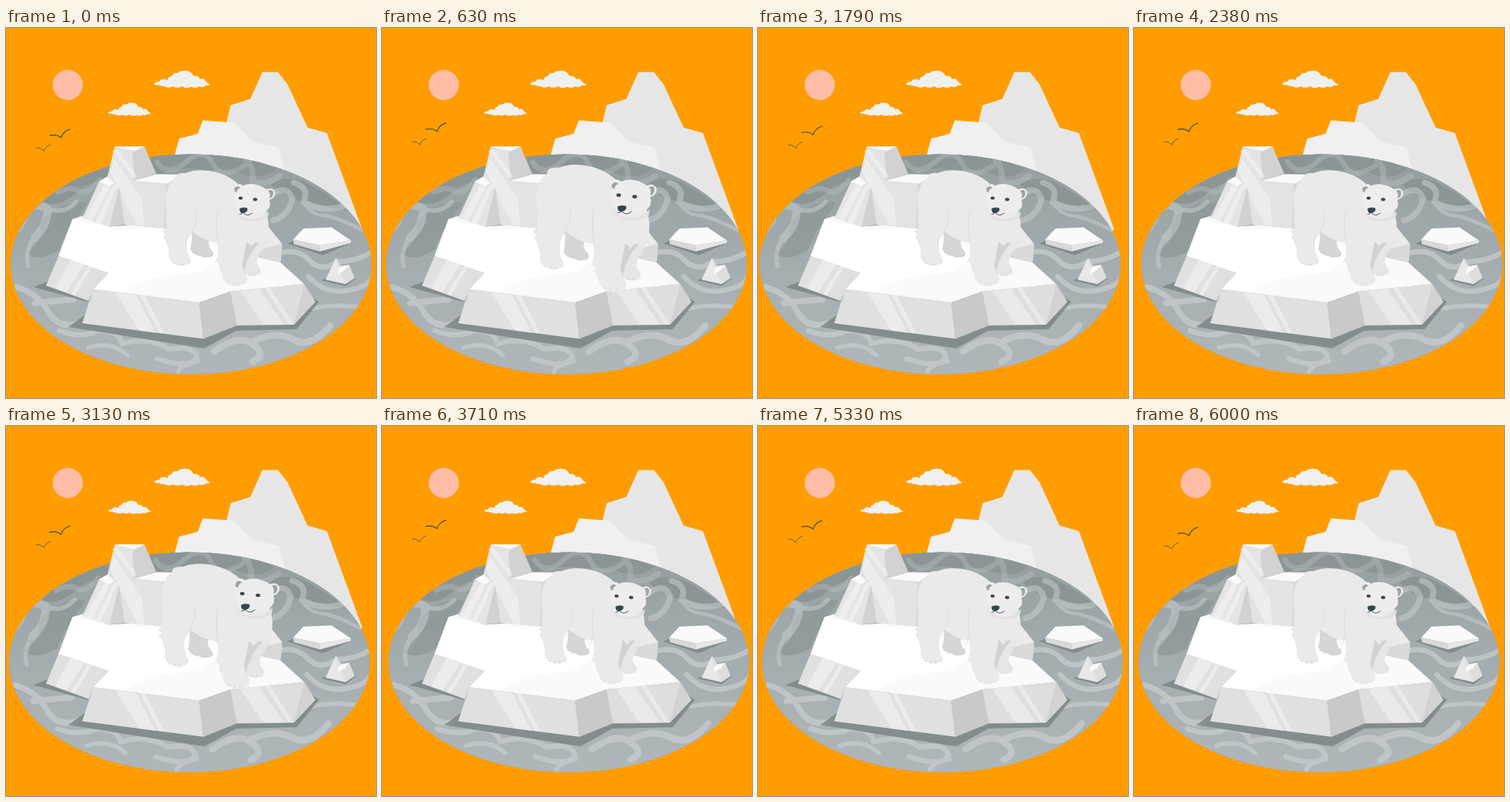
An HTML page that plays this animation: 500x500 px, repeating every 6040 ms.

```html
<!DOCTYPE html>
<html lang="en">
<head>
<meta charset="utf-8">
<title>Polar bear on the ice</title>
<style>
html, body { margin: 0; height: 100%; overflow: hidden; background: #ff9d00; }
svg { display: block; width: 100%; height: 100%; }
.light path { fill: none; stroke: #c6cbce; stroke-linecap: round; stroke-linejoin: round; }
.shine { fill: #fff; opacity: .36; }
.shade { fill: #7c8787; opacity: .85; }
.ink { fill: none; stroke: #37474f; stroke-linecap: round; }
</style>
</head>
<body>
<svg viewBox="0 0 500 500">
  <defs>
    <ellipse id="rim" cx="250" cy="319.3" rx="243.8" ry="148.8"/>
    <clipPath id="pool"><use href="#rim"/></clipPath>
    <linearGradient id="deep" x1="0" y1="0" x2="0" y2="1">
      <stop offset="0" stop-color="#929c9d"/>
      <stop offset=".3" stop-color="#9ea7a9"/>
      <stop offset=".6" stop-color="#a7afb2"/>
      <stop offset="1" stop-color="#b0b7ba"/>
    </linearGradient>
    <path id="cloud" d="M200 75.500Q203 72 207 73Q208 69 213 69Q217 69 218 71Q219 65 224 65Q226 59.500 232 61Q235 57.500 243 57.800Q251 58 253 65Q260 64 262 69Q268 67 270 72Q272 75 276 76Q275 78.500 270 77.500Q267 81 261 79Q256 82 250 79.500Q244 82.500 238 79Q231 82 226 79Q219 82 214 78.500Q209 79 207 77Q202 78 200 75.500Z"/>
  </defs>

  <circle cx="83.500" cy="77" r="20.400" fill="#ffbda7"/>
  <g fill="#f0f0f0">
    <use href="#cloud"/>
    <use href="#cloud" transform="translate(-14.600 57) scale(.763)"/>
  </g>
  <g id="birds" class="ink">
    <path stroke-width="1.100" d="M59 145.300Q68 143 74.500 148.200Q77 139.500 86.500 136.800"/>
    <path stroke-width=".8" d="M41 162Q47 161.500 51 166.500Q53.500 159.500 59.500 158"/>
  </g>

  <path fill="#e6e6e6" d="M346.500 59.500H367.500L380.500 76L407.500 134.500L433.700 142L481.500 272.500L450 290L290 210L298 128L303.500 104.300L330 96Z"/>
  <path fill="#f0f0f0" d="M266 124.800L308 128L333 153.500L368.500 162L376.500 192L300 215L227 175L234 149.500L259 143Z"/>

  <g id="water">
    <use href="#rim" fill="#939d9f"/>
    <g clip-path="url(#pool)">
      <path fill="url(#deep)" d="M0 165H500V475H0Z"/>
      <g fill="#8b9596">
        <path d="M35 238Q62 205 110 192Q165 168 250 166Q320 168 365 190Q352 205 325 199Q302 190 270 192Q225 185 196 204Q160 220 135 208Q112 205 92 226Q70 242 54 236Q45 232 35 238Z"/>
        <path d="M60 250Q85 232 110 236L92 262Q76 284 72 300Q42 318 26 304Q53 287 46 270Q48 258 60 250Z" opacity=".65"/>
        <path d="M358 211Q375 199 402 207Q440 226 461 246Q432 243 408 234Q384 236 358 211Z"/>
      </g>
      <g class="light">
        <g opacity=".3">
          <path stroke-width="7" d="M70 222Q88 213 99 220T127 205M204 181Q218 203 243 181T280 184T329 181"/>
          <path stroke-width="8" d="M325 179Q336 190 333 207Q350 215 370 200"/>
        </g>
        <g opacity=".55">
          <path stroke-width="11" d="M14 272Q28 258 24 244Q40 235 56 244Q57 267 38 284"/>
          <path stroke-width="6" d="M38 284Q25 302 30 322M56 244Q78 253 95 235"/>
          <path stroke-width="8" d="M359 225Q380 211 387 231Q381 255 361 260M389 209Q411 216 402 235Q428 251 462 239"/>
          <path stroke-width="5" d="M402 235Q411 253 434 254Q458 260 490 278"/>
        </g>
        <g opacity=".75">
          <path stroke-width="7" d="M370 304Q394 297 410 314T448 316Q475 315 494 303M409 336Q431 360 460 355T494 338"/>
          <path stroke-width="8" d="M14 350Q45 359 58 385Q72 407 97 399M39 372Q62 369 91 367"/>
          <path stroke-width="7" d="M72 409Q101 420 125 409Q154 409 157 427Q193 416 220 434Q254 428 258 445Q250 462 205 447"/>
          <path stroke-width="9" d="M281 437Q313 414 331 426Q355 441 333 451M333 424Q364 408 388 421T438 402"/>
          <path stroke-width="6" d="M111 432Q142 422 164 442M233 465Q234 456 260 450M414 379Q448 372 484 378"/>
        </g>
      </g>
    </g>
  </g>

  <!-- small floes -->
  <path class="shade" d="M380 291L391 286L433 296L468 290L428 307Z"/>
  <path fill="#fafafa" d="M402 271L440 269.500L466 287L424 293.500L388 286Z"/>
  <path fill="#d9d9d9" d="M388 286L424 293.500L424 302L389 292Z"/>
  <path fill="#e6e6e6" d="M424 293.500L466 287V290.500L424 302Z"/>
  <path class="shade" d="M426 341L438 336L473 338L459 349Z"/>
  <path fill="#dedede" d="M432 340L446 310.500L453 322L464 320L471 338L459 346Z"/>
  <path fill="#e8e8e8" d="M446 310.500L449 325L459 346L432 340Z"/>
  <path fill="#fafafa" d="M449 325L453 322L464 320L458 327L449 333Z"/>

  <!-- main floe -->
  <path class="shade" d="M37 350L60 341L130 364L110 370Z"/>
  <path class="shade" d="M84 404L109 386L267 410L403 385L414 364L423 370L393 407L311 409L268 433Z"/>
  <path fill="#fafafa" d="M90 258L104 254L150 268L215 262L353 268L373 292L371 317L403 346L303 356L261 371L118 353L139 331L71 308Z"/>
  <path fill="#fff" d="M90 258L152 273L216 271L288 300Q282 326 245 332Q185 336 160 357L118 353L139 331L71 308Z"/>
  <path fill="#d9d9d9" d="M354 268L373 292L371 317L340 310Z"/>
  <path fill="#ebebeb" d="M354 268L373 292L343 299L340 275Z"/>
  <path fill="#e0e0e0" d="M71 308L139 331L118 353L112 369L54 348Z"/>
  <path fill="#e0e0e0" d="M118 353L261 371L267 420L103 399Z"/>
  <path fill="#c9c9c9" d="M261 371L303 356L312 402L267 420Z"/>
  <path fill="#dedede" d="M303 356L403 346L418 370L389 401L312 402Z"/>
  <path fill="#d2d2d2" d="M403 346L418 370L389 401Z"/>
  <path class="shine" d="M87 314L106 320L82 357L66 352ZM111 322L116 324L93 361L88 359ZM148 357L176 361L202 412L180 409ZM181 361L188 362L214 413L207 412ZM316 355L342 352L376 401H348ZM350 351L356 350L388 399L382 401Z"/>

  <!-- spires -->
  <path fill="#e4e4e4" d="M126 207L141 201L155 210L140 269L103 257Z"/>
  <path fill="#fafafa" d="M126 207L138 200L154 204L139 214Z"/>
  <path fill="#e3e3e3" d="M147 160H187L173 205L216 211L222 272L160 266L152 214L137 201Z"/>
  <path fill="#fff" d="M147 160H187L173 166Z"/>
  <path fill="#d2d2d2" d="M187 160L203 197L174 206L171 169Z"/>
  <path fill="#fafafa" d="M174 206L203 197.500L235 198L219 211Z"/>
  <path fill="#d9d9d9" d="M216 211L236 200L238 272L213 271Z"/>
  <path fill="#d1d1d1" d="M153 214L160 266L140 269Z"/>
  <path class="shine" d="M146 176L184 232L187 268L178 267L141 195ZM143 166L151 164L175 197L176 207ZM133 212L140 216L116 261L106 258ZM146 211L151 212L128 265L121 263Z"/>

  <g id="bear">
    <path fill="#d6d6d6" d="M251 270Q252 287 249 299Q252 307 262 308Q269 312 278 309Q282 307 279 301Q273 297 274 288L290 280V262Z"/>
    <path fill="#d2d2d2" d="M321 280Q322 302 317 321Q317 332 325 333Q334 337 342 333Q346 329 342 323Q337 319 340 309Q350 296 352 279Z"/>
    <path fill="#e6e6e6" d="M352 284Q330 294 321 331Q334 337 342 333Q346 329 342 323Q337 319 340 309Q350 296 352 284Z"/>
    <path fill="#eaeaea" d="M229 203Q229 195 243 196C256 190 290 189 314 211L352 230Q349 242 354 258Q357 270 351 289Q347 286 344 292Q338 286 332 295L325 289Q323 305 319 319Q320 330 326 337Q328 346 319 347Q312 351 303 347Q294 344 292 333Q286 324 288 318L283 316Q289 306 286 290Q266 287 252 275Q242 288 245 300Q246 309 250 314Q250 320 243 320Q237 324 229 319Q219 317 220 304Q219 290 212 282L216 279L211 275L217 270Q217 255 216 241Q214 213 229 203Z"/>
    <path fill="none" stroke="#d6d6d6" stroke-width=".8" d="M257 248Q260 263 249 278M286 248Q283 270 287 292"/>
    <path fill="#e1e1e1" d="M309 240Q313 257 328 258Q343 261 355 247L354 255Q343 263 326 260Q310 258 309 240Z"/>
    <path fill="#ededed" d="M310 222Q304 216 310 212Q316 209 320 213Q335 207 352 218Q360 214 364 222Q363 231 356 232Q359 242 352 247Q348 253 338 252Q331 258 322 255Q313 253 311 245Q306 235 310 222Z"/>
    <path fill="#9aa2a5" d="M309 221Q307 214 314 214L317 216Q312 217 312 222ZM354 220Q361 217 361 223Q361 229 356 230Q358 223 354 220Z"/>
    <ellipse cx="317" cy="229.800" rx="2.800" ry="2.100" fill="#37474f"/>
    <ellipse cx="336.700" cy="231.700" rx="2.900" ry="2.100" fill="#37474f"/>
    <path fill="#37474f" d="M315.500 244Q319 241.500 325.500 243Q328 246 324 249Q319 252 316 248Z"/>
    <path class="ink" stroke-width=".9" d="M316 251.500Q320 251.500 320.500 249.500Q326 256 333 250"/>
    <path fill="none" stroke="#d0d0d0" stroke-width=".8" d="M227 316v3M233 318v3M239 317v3M300 344v3M307 345v3M314 344v3M328 331v3M335 331v3M259 305v3M267 306v3"/>
  </g>
</svg>
<script>
const [water, bear, birds] = ['water', 'bear', 'birds'].map(id => document.getElementById(id));
const LOOP = 6040, CYCLE = 6000;

// Linear interpolation through [position, value] stops
function track(stops, p) {
  const i = stops.findIndex(s => s[0] > p);
  const [p0, v0] = stops[i - 1], [p1, v1] = stops[i];
  return v0 + (v1 - v0) * (p - p0) / (p1 - p0);
}

const shake = [0, -1, 2, -4, 4, -4, 4, -4, 2, -1, 0].map((v, i) => [i / 10, v]);
const beat = [[0, 1], [.1, 1.1], [.3, 1], [.4, 1], [.5, 1.1], [.6, 1], [1, 1]];
const hover = [[0, 0], [.5, -10], [1, 0]];

function draw(now) {
  const t = now % LOOP, p = t % CYCLE / CYCLE;
  water.setAttribute('transform', `translate(${track(shake, p)} 0)`);
  bear.setAttribute('transform', `translate(288 270.5) scale(${track(beat, p)}) translate(-288 -270.5)`);
  birds.setAttribute('transform', `translate(0 ${track(hover, t % 1500 / 1500)})`);
}

const start = performance.now();
function tick() {
  draw(performance.now() - start);
  requestAnimationFrame(tick);
}
tick();
</script>
</body>
</html>
```
